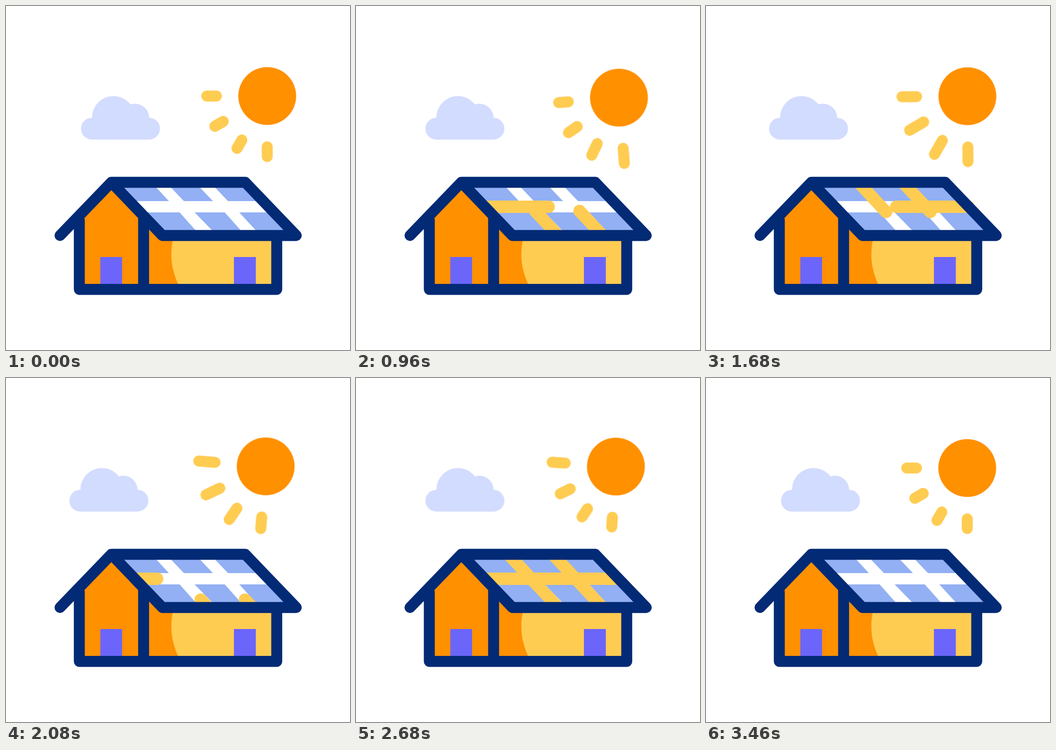
Animation, 640 px wide and 640 px high, one loop 3.56 s. Source, as an HTML page:

```html
<!DOCTYPE html>
<html lang="en">
<head>
<meta charset="utf-8">
<title>Solar house</title>
<style>
  :root {
    --navy: #032a75;
    --orange: #ff9000;
    --yellow: #ffcc52;
    --violet: #6b65fa;
    --panel: #92b0f3;
    --cloud: #d2dcfe;
    --loop: 3560ms;
    --smooth: cubic-bezier(.333, 0, .667, 1);
    --firm: cubic-bezier(.5, 0, .5, 1);
  }
  html, body { margin: 0; width: 100%; height: 100%; overflow: hidden; background: #fff; }
  svg { display: block; width: 100%; height: 100%; }

  .cloud { fill: var(--cloud); animation: drift var(--loop) var(--firm) infinite; }
  .sky { transform-origin: 524px 130px; animation: sway var(--loop) var(--firm) infinite; }
  .sun { fill: var(--orange); }

  .ray {
    stroke: var(--yellow); stroke-width: 20.5; stroke-linecap: round;
    stroke-dasharray: 18 99;
    animation: stretch var(--loop) var(--smooth) calc(180ms + var(--i) * 265ms) infinite;
  }
  .flow {
    fill: none; stroke: var(--yellow); stroke-width: 23; stroke-linecap: round;
    stroke-dasharray: 100 300; stroke-dashoffset: 102;
    animation: flow var(--loop) var(--smooth) infinite;
  }
  .frame { fill: none; stroke: var(--navy); stroke-width: 20.4; stroke-linecap: round; stroke-linejoin: round; }
  .cells { fill: var(--panel); }
  .front { fill: var(--orange); }
  .lit { fill: var(--yellow); }
  .door { fill: var(--violet); }

  @keyframes drift {
    0%, 4.5%, 97.75%, 100% { transform: translateX(0); }
    51.12% { transform: translateX(-22.5px); }
  }
  @keyframes sway {
    0%, 5.06%, 97.19%, 100% { transform: rotate(0deg); }
    32.02% { transform: rotate(-5deg); }
    64.04% { transform: rotate(5deg); }
  }
  @keyframes stretch {
    0%, 66.57%, 100% { stroke-dasharray: 18 99; }
    29.78% { stroke-dasharray: 30.5 99; }
  }
  /* Fill, drain forward, fill again, pull back */
  @keyframes flow {
    0%, 17.98% { stroke-dashoffset: 102; }
    36.52%, 41.01% { stroke-dashoffset: 0; }
    54.49% { stroke-dashoffset: -102; }
    54.5% { stroke-dashoffset: 102; }
    69.66%, 73.03% { stroke-dashoffset: 0; }
    97.19%, 100% { stroke-dashoffset: 102; }
  }
</style>
</head>
<body>
<svg viewBox="0 0 640 640" aria-label="House with solar panels">
  <g class="cloud">
    <rect x="139.5" y="208" width="147" height="40.4" rx="20.2"/>
    <circle cx="200" cy="207.5" r="40"/>
    <circle cx="240" cy="208" r="26.3"/>
  </g>

  <g class="sky">
    <circle class="sun" cx="486" cy="167.5" r="53.8"/>
    <g transform="translate(486 167.5)">
      <path class="ray" style="--i:0" d="M0 94.5V126"/>
      <path class="ray" style="--i:1" d="M0 94.5V126" transform="rotate(30)"/>
      <path class="ray" style="--i:2" d="M0 94.5V126" transform="rotate(60)"/>
      <path class="ray" style="--i:3" d="M0 94.5V126" transform="rotate(90)"/>
    </g>
  </g>

  <path class="front" d="M136 404L196 333L256 392L291 427H503V527H136Z"/>
  <path class="lit" d="M311.5 427L310 437Q302 478 320 517V527H503V427Z"/>
  <path class="door" d="M175.5 467H216V520H175.5ZM424 467H464.8V520H424Z"/>

  <path fill="#fff" d="M196 328H445L540 427H291Z"/>
  <path class="cells" d="M205 332H274.5L303 363H236ZM301.5 332H355.5L385 363H331ZM383.5 332H440L470 363H413ZM255 384H323L356 421H288ZM351 384H407L440 421H387ZM434 384H492L526 421H468Z"/>

  <path class="flow" pathLength="100" d="M244 373.5H488"/>
  <path class="flow" pathLength="100" d="M376 427L285 329.5"/>
  <path class="flow" pathLength="100" d="M458.5 427L367.5 329.5"/>

  <path class="frame" d="M136.4 398V527.3H503.7V430M256 394V527"/>
  <path class="frame" d="M100.5 427L196 328H445L540 427H291L196 328"/>
</svg>
</body>
</html>
```
